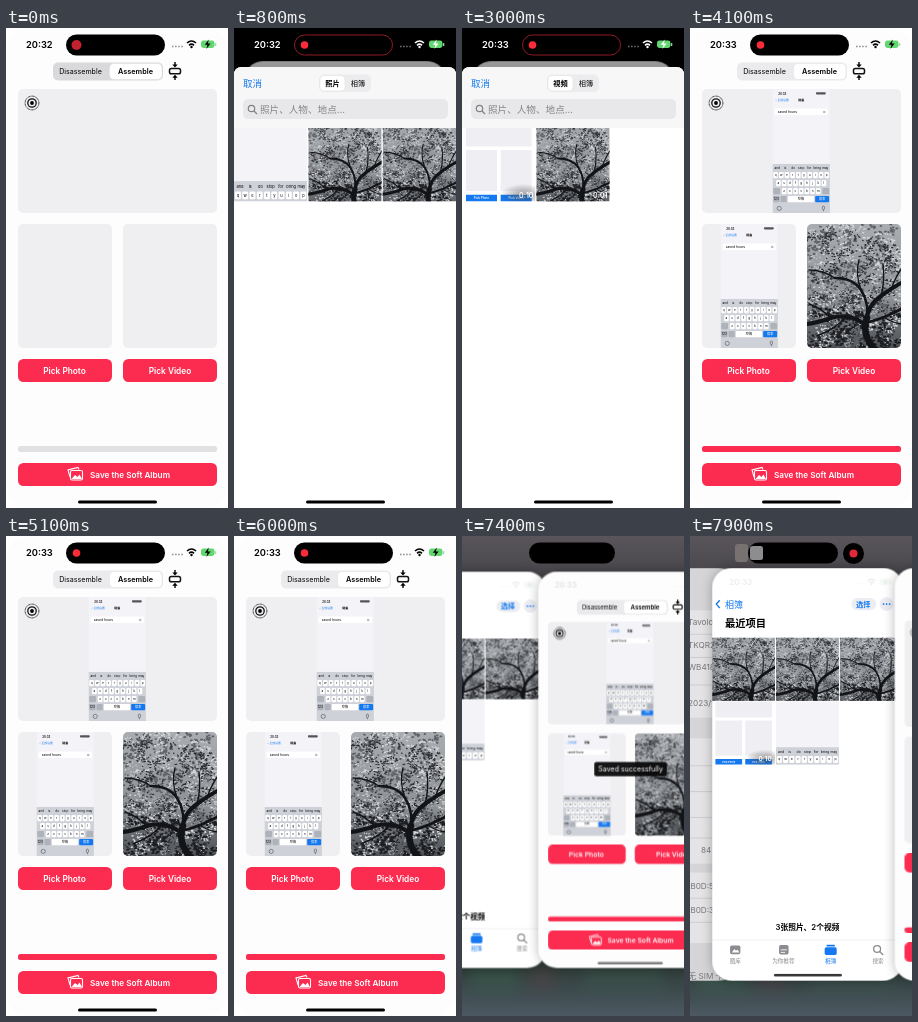
Animation of 222x480 px, one loop 8 s. Source, as an HTML page:

```html
<!DOCTYPE html>
<html lang="zh">
<head>
<meta charset="utf-8">
<title>Assemble demo</title>
<style>
@property --p { syntax: "<number>"; inherits: true; initial-value: 0; }
html, body { margin: 0; width: 100%; height: 100%; overflow: hidden; background: #fff; }
#stage {
  display: block; width: 222px; height: 480px;
  font-family: Inter, "Noto Sans CJK SC", "Noto Sans CJK", sans-serif;
  animation: sheet 8s infinite;
}
text { dominant-baseline: central; }
.mid { text-anchor: middle; }
.b { font-weight: 600; }
.blue { fill: #1479f0; }
.w { fill: #fff; }
.red { fill: #fc2b50; }
.cell { fill: #efeef1; }

/* --p: how far the picker sheet is open */
@keyframes sheet {
  0%, 2.5% { --p: 0; animation-timing-function: cubic-bezier(.25,.8,.35,1); }
  9%, 17.1% { --p: 1; animation-timing-function: ease-out; }
  22.75%, 26.5% { --p: 0; animation-timing-function: cubic-bezier(.25,.8,.35,1); }
  33%, 39.4% { --p: 1; animation-timing-function: ease-out; }
  45%, 100% { --p: 0; }
}
.base { --v: calc(255 - var(--p) * 99999); fill: rgb(var(--v) var(--v) var(--v)); }
.push { transform: translate(calc(var(--p) * 9px), calc(var(--p) * 33px)) scale(calc(1 - .08 * var(--p))); }
.dim { opacity: calc(var(--p) * var(--p) * .4); }
.sheet { transform: translateY(calc(39px + (1 - var(--p)) * 441px)); animation: before 8s step-end infinite; }
.ring { opacity: calc(var(--p) * 2.6); }
.status { --c: calc(var(--p) * 663); --ink: rgb(var(--c) var(--c) var(--c)); animation: fade 8s infinite; }
.ink { fill: var(--ink); }
.line { fill: none; stroke: var(--ink); }

.inset, .drop { animation: inset 8s step-end infinite; }
.inset { --d: 15px; }
.drop { --d: 6px; }
@keyframes inset {
  0%, 22.8%, 45% { transform: none; }
  17.1%, 39.4% { transform: translateY(var(--d)); }
  100% { transform: none; }
}

/* hard switches */
.first { animation: first 8s step-end infinite; }
.second { animation: second 8s step-end infinite; }
.photo { animation: photo 8s step-end infinite; }
.video { animation: video 8s step-end infinite; }
.result { animation: result 8s step-end infinite; }
.wall { animation: wall 8s step-end infinite; }
.old { animation: old 8s step-end infinite; }
.new { animation: new 8s step-end infinite; }
@keyframes first { 0% { opacity: 1 } 24%, 100% { opacity: 0 } }
@keyframes second { 0% { opacity: 0 } 24%, 100% { opacity: 1 } }
@keyframes photo { 0% { opacity: 0 } 17.1%, 100% { opacity: 1 } }
@keyframes video { 0% { opacity: 0 } 39.4%, 100% { opacity: 1 } }
@keyframes result { 0% { opacity: 0 } 49.5%, 100% { opacity: 1 } }
@keyframes wall { 0% { opacity: 0 } 87%, 100% { opacity: 1 } }
@keyframes before { 0% { opacity: 1 } 87%, 100% { opacity: 0 } }
@keyframes old { 0% { opacity: 1 } 12%, 100% { opacity: 0 } }
@keyframes new { 0% { opacity: 0 } 12%, 100% { opacity: 1 } }

.seg { animation: seg 8s infinite; }
@keyframes seg { 0%, 1.2% { fill: #d9d8db } 4%, 100% { fill: #ebeaed } }
.bar { animation: bar 8s linear infinite; }
@keyframes bar { 0%, 45.5% { width: 0 } 49.5%, 100% { width: 199px } }
.save { animation: save 8s infinite; }
@keyframes save { 0%, 77.5% { opacity: 1 } 79% { opacity: .6 } 81%, 100% { opacity: 1 } }
.toast { animation: toast 8s infinite; }
@keyframes toast { 0%, 81% { opacity: 0 } 83.5%, 100% { opacity: 1 } }

/* app switcher */
.app { animation: app 8s infinite; }
.album { animation: album 8s infinite; }
.about { animation: about 8s infinite; }
@keyframes app {
  0%, 87% { transform: translate(0, 0) scale(1); }
  92.5% { transform: translate(76px, 35.5px) scale(.826); }
  98.75%, 100% { transform: translate(204.5px, 32px) scale(.86); }
}
@keyframes album {
  0%, 87% { transform: translate(-223px, 0) scale(1); }
  92.5% { transform: translate(-99.5px, 35.5px) scale(.826); }
  98.75%, 100% { transform: translate(22px, 32px) scale(.86); }
}
@keyframes about {
  0%, 92.5% { transform: translate(-275px, 35.5px) scale(.826); }
  98.75%, 100% { transform: translate(-143px, 32px) scale(.86); }
}
@keyframes fade { 0%, 87% { opacity: 1 } 91%, 100% { opacity: .12 } }
.home { animation: home 8s infinite; }
@keyframes home { 0%, 87% { opacity: 1 } 92%, 100% { opacity: .5 } }
.late { animation: late 8s infinite; }
@keyframes late { 0%, 93% { opacity: 0 } 98%, 100% { opacity: .8 } }

.pill { animation: pill 8s infinite; }
@keyframes pill {
  0%, 88% { x: 60px; width: 99px; }
  92%, 95% { x: 67px; width: 86px; }
  98.75%, 100% { x: 58px; width: 90px; }
}
.dot { animation: dot 8s infinite; }
@keyframes dot {
  0%, 1.2% { r: 5px; fill: #c4222f; opacity: 1; }
  5% { r: 3.8px; fill: #fb2c3a; }
  87% { opacity: 1; }
  90%, 100% { r: 3.8px; fill: #fb2c3a; opacity: 0; }
}
.blob { animation: blob 8s infinite; }
@keyframes blob {
  0%, 95% { opacity: 0; transform: translateX(-10px); }
  98%, 100% { opacity: 1; transform: none; }
}
</style>
</head>
<body>
<svg id="stage" viewBox="0 0 222 480">
  <defs>
    <clipPath id="screen"><rect width="222" height="480" rx="23"/></clipPath>
    <clipPath id="card"><rect x="117" y="196" width="94" height="124" rx="5"/></clipPath>
    <linearGradient id="dusk" x2="0" y2="1">
      <stop stop-color="#59555b"/><stop offset=".08" stop-color="#49474c"/>
      <stop offset=".9" stop-color="#2f3d39"/><stop offset="1" stop-color="#4c5963"/>
    </linearGradient>
    <linearGradient id="sky" x2="0" y2="1">
      <stop stop-color="#a9acb0"/><stop offset=".6" stop-color="#8d9094"/><stop offset="1" stop-color="#4d5054"/>
    </linearGradient>
    <radialGradient id="shade"><stop stop-color="#444" stop-opacity=".55"/><stop offset="1" stop-color="#444" stop-opacity="0"/></radialGradient>
    <filter id="soft" x="-50%" y="-50%" width="200%" height="200%"><feGaussianBlur stdDeviation="7"/></filter>

    <symbol id="tree" viewBox="0 0 94 124" preserveAspectRatio="xMidYMid slice">
      <rect width="94" height="124" fill="url(#sky)"/>
      <g id="bloom" fill="none" stroke-linecap="round"></g>
      <g fill="none" stroke="#131417" stroke-linecap="round">
        <path stroke-width="6.500" d="M68 126Q54 110 60 94"/>
        <path stroke-width="4" d="M60 96Q60 82 74 72T96 58M60 102Q42 88 24 94T-2 100"/>
        <path stroke-width="2.600" d="M60 96Q62 78 54 66T28 54M62 98Q78 94 96 84"/>
        <path stroke-width="1.400" d="M74 72Q78 58 76 40M54 66Q48 50 52 36M28 54Q16 46 2 46M24 94Q14 84 2 80M78 94Q88 100 96 100M40 92Q30 104 10 112M84 65Q90 50 95 44"/>
      </g>
    </symbol>

    <symbol id="shot" viewBox="0 0 222 480" preserveAspectRatio="xMidYMid slice">
      <rect width="222" height="480" fill="#f3f3f8"/>
      <g font-size="11">
        <text class="b" x="22" y="18">20:33</text>
        <rect x="168" y="13" width="38" height="8" rx="3" fill="#555"/>
        <text class="blue" x="12" y="43">‹ 全部设置</text>
        <text class="mid b" x="111" y="43">键盘</text>
      </g>
      <rect x="8" y="76" width="206" height="25" rx="5" fill="#fff"/>
      <text x="20" y="89" font-size="13">saved hours</text>
      <circle cx="200" cy="89" r="5" fill="#b9b9be"/>
      <rect y="290" width="222" height="190" fill="#cfd1d8"/>
      <g id="keys" class="mid" font-size="12"></g>
    </symbol>

    <symbol id="mini" viewBox="0 0 222 480" preserveAspectRatio="xMidYMid slice">
      <rect width="222" height="480" fill="#fff"/>
      <path fill="#efeef3" d="M12 61h199v124H12zM12 196h94v124H12zM117 196h94v124H117z"/>
      <path fill="#1479f0" d="M12 331h94v23H12zM117 331h94v23H117z"/>
      <g class="mid b w" font-size="9"><text x="59" y="342">Pick Photo</text><text x="164" y="342">Pick Video</text></g>
      <ellipse cx="186" cy="332" rx="70" ry="34" fill="url(#shade)"/>
    </symbol>

    <g id="signal">
      <path class="line" stroke-width="1.6" d="M181 15Q185.500 11 190 15M183 17.300Q185.500 15.100 188 17.300"/>
      <circle class="ink" cx="185.500" cy="19" r="1.200"/>
      <path class="line" stroke-width="1.500" stroke-dasharray="1.500 1.600" opacity=".45" d="M166 18.500h11"/>
      <rect x="195" y="12.500" width="13.500" height="7.500" rx="2.400" fill="#62d66f"/>
      <rect x="209" y="15" width="1.300" height="3" rx=".6" fill="#9bdca2"/>
      <path class="ink" d="M202.800 11.500l-4 5.300h2.600l-1 4.200 4.200-5.500h-2.700z"/>
    </g>
    <rect id="shadow" width="222" height="480" rx="23" filter="url(#soft)" opacity=".28"/>
  </defs>

  <rect class="base" width="222" height="480"/>
  <g class="wall">
    <rect width="222" height="480" fill="url(#dusk)"/>
    <g filter="url(#soft)" opacity=".22">
      <rect x="8" y="430" width="48" height="26" fill="#3f7f5c"/>
      <rect x="66" y="432" width="28" height="22" fill="#784349"/>
      <rect x="120" y="430" width="80" height="26" fill="#446a58"/>
    </g>
  </g>

  <g class="about" clip-path="url(#screen)">
    <rect width="222" height="480" fill="#d5d5d8"/>
    <path fill="#e4e4e6" d="M10 49h222v125H10zM10 198h222v146H10zM10 354h222v82H10z"/>
    <path stroke="#c9c9cc" d="M20 77h200M20 104h200M20 136h200M20 230h200M20 260h200M20 290h200M20 314h200M20 384h200M20 412h200"/>
    <g id="facts" font-size="9.500" fill="#77777b"></g>
  </g>

  <g class="album">
    <use class="wall" href="#shadow"/>
    <g clip-path="url(#screen)">
      <rect width="222" height="480" fill="#fff"/>
      <g opacity=".07" style="--ink:#000"><text class="b" x="20" y="16" font-size="9.300">20:33</text><use href="#signal"/></g>
      <path d="M9 37.500l-4 4.500 4 4.500" fill="none" stroke="#1479f0" stroke-width="1.600"/>
      <text class="blue" x="15" y="42" font-size="10.500">相簿</text>
      <text x="15" y="64" font-size="12" font-weight="700">最近项目</text>
      <rect x="162" y="35" width="29" height="14" rx="7" fill="#ebedf2"/>
      <text class="blue mid b" x="176" y="42" font-size="8.500">选择</text>
      <circle cx="203" cy="42" r="8" fill="#ebedf2"/>
      <g class="blue"><circle cx="199.500" cy="42" r="1"/><circle cx="203" cy="42" r="1"/><circle cx="206.500" cy="42" r="1"/></g>
      <use href="#tree" y="81" width="73.300" height="73.300"/>
      <use href="#tree" x="74.300" y="81" width="73.300" height="73.300"/>
      <use href="#tree" x="148.600" y="81" width="73.400" height="73.300"/>
      <use href="#mini" y="155.300" width="73.300" height="73.300"/>
      <use href="#shot" x="74.300" y="155.300" width="73.300" height="73.300"/>
      <text class="w b" x="54" y="222" font-size="7.500">0:10</text>
      <text class="mid b" x="111" y="418" font-size="9">3张照片、2个视频</text>
      <path d="M0 432.500h222" stroke="#eee"/>
      <g fill="#8b8b90">
        <rect x="21" y="439" width="12" height="10" rx="2"/><path d="M23 447l3-4 2 2 1.500-1.500 2.500 3.500z" fill="#fff"/>
        <rect x="78" y="438.500" width="11" height="11" rx="2"/><path d="M80 444h7M80 447h5" stroke="#fff"/>
        <g class="blue"><rect x="131" y="441" width="14" height="9" rx="2"/><rect x="133" y="438" width="10" height="2" rx="1"/></g>
        <g fill="none" stroke="#8b8b90" stroke-width="1.500"><circle cx="192" cy="443" r="4"/><path d="M195 446l4 4"/></g>
        <g class="mid" font-size="6.500">
          <text x="27" y="457">图库</text><text x="83" y="457">为你推荐</text>
          <text class="blue" x="138" y="457">相簿</text><text x="193" y="457">搜索</text>
        </g>
      </g>
      <rect class="late" x="72" y="472" width="79" height="3" rx="1.500"/>
    </g>
  </g>

  <g class="app">
    <use class="wall" href="#shadow"/>
    <g class="push" clip-path="url(#screen)">
      <rect width="222" height="480" fill="#fefdfe"/>
      <rect class="seg" x="47" y="34.500" width="110" height="18" rx="5"/>
      <rect x="103.500" y="35.500" width="52.500" height="16" rx="4.500" fill="#fff" stroke="#dedde0" stroke-width=".5"/>
      <text class="mid" x="74.500" y="43.500" font-size="7.100">Disassemble</text>
      <text class="mid b" x="129.500" y="43.500" font-size="7.300">Assemble</text>
      <g fill="none" stroke="#111" stroke-width="1.500">
        <rect x="163.500" y="40.500" width="11" height="5.200" rx="1.800"/>
        <path d="M169 34v4M169 52v-4"/>
      </g>
      <path d="M166.300 36.500h5.400l-2.700 3zM166.300 49.700h5.400l-2.700-3z"/>

      <rect class="cell" x="12" y="61" width="199" height="124" rx="5"/>
      <use class="result" href="#shot" x="82.500" y="61" width="57.400" height="124"/>
      <circle cx="26" cy="75" r="1.900"/>
      <g fill="none" stroke="#111"><circle cx="26" cy="75" r="4.200" stroke-width="1.300"/><circle cx="26" cy="75" r="6.900" stroke-dasharray=".9 .5"/></g>

      <rect class="cell" x="12" y="196" width="94" height="124" rx="5"/>
      <rect class="cell" x="117" y="196" width="94" height="124" rx="5"/>
      <use class="photo" href="#shot" x="30.500" y="196" width="57.400" height="124"/>
      <g class="video" clip-path="url(#card)"><use href="#tree" x="117" y="196" width="94" height="124"/></g>

      <rect class="red" x="12" y="331" width="94" height="23" rx="5.500"/>
      <rect class="red" x="117" y="331" width="94" height="23" rx="5.500"/>
      <g class="mid b w" font-size="8.300"><text x="58.500" y="342.700">Pick Photo</text><text x="164" y="342.700">Pick Video</text></g>

      <rect x="12" y="418" width="199" height="6" rx="2.500" fill="#e1e0e3"/>
      <rect class="bar red" x="12" y="418" height="6" rx="2.500"/>
      <g class="save">
        <rect class="red" x="12" y="435" width="199" height="23" rx="5.500"/>
        <g fill="none" stroke="#fff" stroke-width="1.100">
          <path d="M64 449l-2-7 10-2.500 1 2"/><rect x="64.500" y="442.500" width="12" height="9.500" rx="1.500"/>
        </g>
        <path class="w" d="M65.500 451l3.500-4 2.500 2 2-2.500 2.500 4.500z"/>
        <text class="b w" x="84" y="446.500" font-size="8.200">Save the Soft Album</text>
      </g>
      <g class="toast">
        <rect x="68" y="230.500" width="88" height="17.500" rx="2.500" fill="#080809" opacity=".94"/>
        <text class="mid w" x="112" y="239.300" font-size="8.600">Saved successfully</text>
      </g>
      <rect class="dim" width="222" height="480"/>
    </g>

    <g class="sheet">
      <path fill="#fff" d="M0 460V8Q0 0 8 0H214Q222 0 222 8V460z"/>
      <path fill="#f7f7f8" d="M0 60V8Q0 0 8 0H214Q222 0 222 8V60z"/>
      <g class="inset">
        <g class="drop">
          <rect y="35" width="222" height="26" fill="#f7f7f8"/>
          <g class="first">
            <use href="#shot" y="61" width="73.300" height="73.300"/>
            <use href="#tree" x="74.300" y="61" width="73.300" height="73.300"/>
            <use href="#tree" x="148.600" y="61" width="73.400" height="73.300"/>
          </g>
          <g class="second">
            <use href="#mini" y="61" width="73.300" height="73.300"/>
            <use href="#tree" x="74.300" y="61" width="73.300" height="73.300"/>
            <g class="w b" font-size="7" text-anchor="end"><text x="71.500" y="128">0:10</text><text x="145.500" y="128">0:01</text></g>
          </g>
        </g>
        <text class="blue" x="9" y="16" font-size="9.500">取消</text>
        <rect x="85" y="7.500" width="52" height="17.500" rx="5" fill="#ececee"/>
        <rect x="86" y="8.500" width="25" height="15.500" rx="4" fill="#fff" stroke="#ddd" stroke-width=".5"/>
        <g class="mid" font-size="7.200">
          <text class="b first" x="98.500" y="16">照片</text><text class="b second" x="98.500" y="16">視頻</text><text x="124" y="16">相簿</text>
        </g>
        <rect x="9" y="32" width="205" height="20" rx="5" fill="#e8e8ea"/>
        <g fill="none" stroke="#808085" stroke-width="1.200"><circle cx="17.500" cy="41.500" r="3.200"/><path d="M20 44l3 3"/></g>
        <text x="26" y="42" font-size="9.600" fill="#85858a">照片、人物、地点...</text>
      </g>
    </g>

    <g class="status">
      <g class="ink b" font-size="9.300"><text class="old" x="20" y="16.500">20:32</text><text class="new" x="20" y="16.500">20:33</text></g>
      <use href="#signal"/>
    </g>
    <rect class="home" x="72" y="472.500" width="79" height="3" rx="1.500"/>
  </g>

  <g class="blob">
    <rect x="45" y="8" width="13" height="18" rx="3" fill="#77726f"/>
    <circle cx="163.500" cy="17.500" r="10.500"/>
    <circle cx="163.500" cy="17.500" r="4" fill="#e3283a"/>
  </g>
  <rect class="pill" y="6.500" height="21" rx="10.500"/>
  <rect class="ring" x="60.500" y="7" width="98" height="20" rx="10" fill="none" stroke="#8f1b25"/>
  <circle class="dot" cx="70.500" cy="17"/>
  <rect class="blob" x="60" y="10" width="13" height="14" rx="2.500" fill="#8d8d90"/>
</svg>
<script>
const put = (id, markup) => document.getElementById(id).innerHTML = markup;
const label = (s, x, y, attrs = "") => `<text x="${x}" y="${y}" ${attrs}>${s}</text>`;

let seed = 7;
const rand = () => (seed = seed * 16807 % 2147483647) / 2147483647;

// Blossom specks in small clusters: one path of round dots per tone
const specks = (color, clusters, size, top) => {
  let d = "";
  for (let i = 0; i < clusters; i++) {
    const cx = rand() * 94, cy = top + rand() * (124 - top);
    for (let j = 0; j < 7; j++) {
      const x = cx + (rand() + rand() - 1) * 8, y = cy + (rand() + rand() - 1) * 6;
      d += `M${x.toFixed(1)} ${y.toFixed(1)}l${(rand() * 1.4).toFixed(1)} ${(rand() - .5).toFixed(1)}`;
    }
  }
  return `<path d="${d}" stroke="${color}" stroke-width="${size}"/>`;
};
put("bloom",
  specks("#606367", 120, 1.8, 0) + specks("#d4d6d9", 95, 1.3, 0) +
  specks("#2c2e32", 130, 1.2, 8) + specks("#b9bcc0", 50, 1, 30) + specks("#1d1e21", 40, 1.9, 84));

// Keyboard
const key = (x, y, w, fill = "#fff") => `<rect x="${x}" y="${y - 12}" width="${w}" height="24" rx="4" fill="${fill}"/>`;
let keys = "and is do stop for bring may".split(" ").map((s, i) => label(s, 18 + i * 31, 306)).join("");
["qwertyuiop", "asdfghjkl", "zxcvbnm"].forEach((row, r) => {
  const y = 333 + r * 31, left = 111 - row.length * 11;
  [...row].forEach((c, i) => keys += key(left + i * 22 + 2, y, 18) + label(c, left + i * 22 + 11, y));
});
const gray = "#aeb2bb";
keys += key(3, 395, 26, gray) + key(193, 395, 26, gray) +
  key(3, 426, 24, gray) + label("123", 15, 426) + key(31, 426, 24, gray) +
  key(59, 426, 102) + label("空格", 110, 426) +
  key(165, 426, 54, "#1479f0") + label("搜索", 192, 426, 'fill="#fff"') +
  '<g fill="none" stroke="#55585e" stroke-width="2.5"><circle cx="26" cy="462" r="8"/><rect x="193" y="453" width="8" height="14" rx="4"/><path d="M197 468v5"/></g>';
put("keys", keys);

// Values on the device info card
put("facts", [
  ["Tavolo", 63], ["TKQR2", 90], ["WB418K", 115], ["2023/1/8", 157], ["84", 328],
  [":B0D:51", 370], [":B0D:39", 398], ["无 SIM 卡", 474]
].map(([s, y]) => label(s, s === "84" ? 179 : 164, y)).join(""));
</script>
</body>
</html>
```
